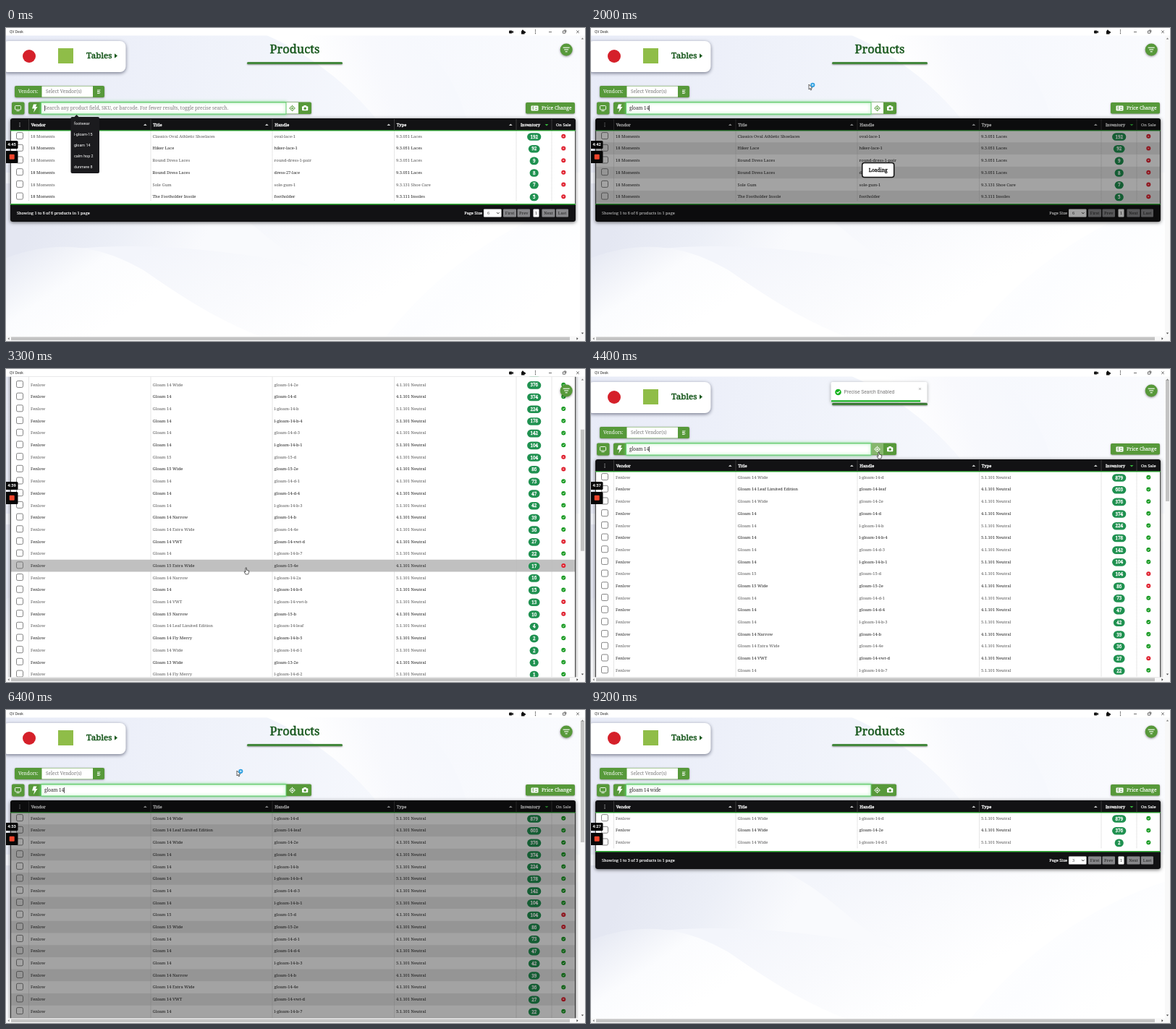
These frames come from a looping animation (800x433 px, 9500 ms). An HTML page with a canvas:

```html
<!DOCTYPE html>
<html lang="en">
<head>
<meta charset="utf-8">
<title>Products</title>
<style>
html, body { margin: 0; width: 100%; height: 100%; overflow: hidden; background: #fff; }
canvas { display: block; width: 800px; height: 433px; }
</style>
</head>
<body>
<canvas id="stage" width="800" height="433"></canvas>
<script>
const ctx = document.getElementById('stage').getContext('2d');
const LOOP = 9500, STEP = 100;
const SERIF = '"Noto Serif", serif', SANS = 'Roboto, sans-serif';
const GREEN = '#57993a', DARK_GREEN = '#17571c', LINE_GREEN = '#35b53a', BLACK = '#121214';
const ROW = 16.69, ROWS_TOP = 141.5, FOOT_HEIGHT = 24;
const COLUMNS = [31.5, 200, 368, 536.5, 705, 754];

const clamp = (v, lo = 0, hi = 1) => Math.min(hi, Math.max(lo, v));
const ease = p => p * p * (3 - 2 * p);
const during = (t, a, b) => t >= a && t < b;

// Each entry: name, handle, stock; "~" stands for the model name.
const shoes = `14 Wide|l-~-14-d|879
14 Leaf Limited Edition|~-14-leaf|603
14 Wide|~-14-2e|376
14|~-14-d|374
14|l-~-14-b|224
14|l-~-14-b-4|178
14|~-14-d-3|142
14|l-~-14-b-1|104
15|~-15-d|104
15 Wide|~-15-2e|86
14|~-14-d-1|73
14|~-14-d-4|47
14|l-~-14-b-3|42
14 Narrow|~-14-b|39
14 Extra Wide|~-14-4e|36
14 VWT|~-14-vwt-d|27
14|l-~-14-b-7|22
15 Extra Wide|~-15-4e|17
14 Narrow|l-~-14-2a|16
14|l-~-14-b-6|15
14 VWT|l-~-14-vwt-b|13
15 Narrow|~-15-b|10
14 Leaf Limited Edition|l-~-14-leaf|4
14 Fly Merry|l-~-14-b-5|2
14 Wide|l-~-14-d-1|2
13 Wide|~-13-2e|1
14 Fly Merry|l-~-14-d-2|1`.split('\n').map(line => {
  const [name, handle, stock] = line.split('|');
  return {
    vendor: 'Fenlow', title: 'Gloam ' + name, handle: handle.replace('~', 'gloam'), stock,
    type: (handle.startsWith('l-') ? '5' : '4') + '.1.101 Neutral',
    sale: !/^15|VWT/.test(name)
  };
});

const laces = `Classics Oval Athletic Shoelaces|oval-lace-1|051 Laces|192
Hiker Lace|hiker-lace-1|051 Laces|92
Round Dress Laces|round-dress-1-pair|051 Laces|9
Round Dress Laces|dress-27-lace|051 Laces|8
Sole Gum|sole-gum-1|131 Shoe Care|7
The Footholder Insole|footholder|111 Insoles|5`.split('\n').map(line => {
  const [title, handle, type, stock] = line.split('|');
  return { vendor: '18 Moments', title, handle, stock, type: '9.3.' + type, sale: false };
});

const views = {
  laces: { rows: laces, foot: 244 },
  all: { rows: shoes, foot: 930 },
  exact: { rows: shoes.filter(r => r.title === 'Gloam 14'), foot: 313 },
  wide: { rows: shoes.filter(r => r.title === 'Gloam 14 Wide'), foot: 196 }
};

const mousePath = [
  [200, 150, 200], [500, 106, 160], [700, 106, 160], [1300, 301, 78], [2200, 301, 78],
  [2700, 332, 275], [3500, 332, 275], [4000, 398, 115], [4800, 398, 115],
  [5500, 340, 110], [6100, 319, 84], [6900, 319, 84]
];

function mouseAt(t) {
  if (!during(t, 200, 6900)) return null;
  const i = mousePath.findIndex(p => p[0] > t);
  const [a, b] = [mousePath[i - 1], mousePath[i]];
  const p = ease((t - a[0]) / (b[0] - a[0]));
  return { x: a[1] + (b[1] - a[1]) * p, y: a[2] + (b[2] - a[2]) * p };
}

function stateAt(t) {
  const view = t < 2300 ? views.laces : t < 6800 ? views.all : t < 8800 ? views.exact : views.wide;
  const typed = Math.floor(clamp((t - 7100) / 160, 0, 5));
  return {
    t, view, mouse: mouseAt(t),
    scroll: 161.5 * (ease(clamp((t - 2600) / 500)) - ease(clamp((t - 3400) / 400))),
    loading: during(t, 900, 2300) || during(t, 6200, 6800) || during(t, 8300, 8800),
    query: t < 600 ? '' : 'gloam 14' + ' wide'.slice(0, typed),
    precise: t >= 4200
  };
}

function box(x, y, w, h, fill, r = 0, stroke, width = 1) {
  ctx.beginPath();
  ctx.roundRect(x, y, w, h, r);
  if (fill) { ctx.fillStyle = fill; ctx.fill(); }
  if (stroke) { ctx.strokeStyle = stroke; ctx.lineWidth = width; ctx.stroke(); }
}

function disc(x, y, r, fill) {
  ctx.beginPath();
  ctx.arc(x, y, r, 0, 7);
  ctx.fillStyle = fill;
  ctx.fill();
}

function poly(points, fill, stroke, width = 0.8) {
  ctx.beginPath();
  points.forEach(([x, y]) => ctx.lineTo(x, y));
  if (fill) { ctx.closePath(); ctx.fillStyle = fill; ctx.fill(); }
  if (stroke) { ctx.strokeStyle = stroke; ctx.lineWidth = width; ctx.stroke(); }
}

function text(str, x, y, size, color, { align = 'left', font = SERIF, heavy = 0, weight = 400 } = {}) {
  ctx.font = `${weight} ${size}px ${font}`;
  ctx.textAlign = align;
  ctx.fillStyle = color;
  ctx.fillText(str, x, y + size * 0.34);
  if (heavy) {
    ctx.strokeStyle = color;
    ctx.lineWidth = heavy;
    ctx.strokeText(str, x, y + size * 0.34);
  }
}

function withShadow(color, blur, dy, draw) {
  ctx.save();
  ctx.shadowColor = color;
  ctx.shadowBlur = blur;
  ctx.shadowOffsetY = dy;
  draw();
  ctx.restore();
}

function swoosh(path, x0, y0, x1, y1, ...stops) {
  const g = ctx.createLinearGradient(x0, y0, x1, y1);
  stops.forEach((c, i) => g.addColorStop(i / (stops.length - 1), c));
  ctx.fillStyle = g;
  ctx.fill(new Path2D(path));
}

function drawBackground() {
  swoosh('M0 0H800V433H0Z', 0, 0, 800, 120, '#e8ebf7', '#eff2fa', '#f6f8fd', '#fafbfe');
  swoosh('M360 10H560C610 50 640 100 650 200H560C520 120 450 50 360 10Z', 440, 100, 600, 40, '#ffffff', '#f8f9fd', '#f6f8fd');
  swoosh('M0 200H800V433H0Z', 300, 240, 420, 433, '#f3f5fb', '#f9fafd', '#ffffff');
  swoosh('M0 215H250C330 250 350 290 420 330C280 300 130 290 0 320Z', 60, 220, 260, 320, '#e4e7f2', '#eceff7', '#f9fafd');
  swoosh('M0 318C70 292 130 300 190 335C240 370 300 410 370 433H0Z', 20, 300, 110, 433, '#e6e9f3', '#fbfcfe', '#ffffff');
  swoosh('M520 433C590 340 690 270 800 235V433Z', 560, 300, 680, 433, '#ffffff', '#fcfdff', '#ffffff');
}

function drawTopBar() {
  box(0, 0, 800, 10.5, '#fff');
  text('QV Desk', 5, 5.5, 5, '#333', { font: SANS });
  box(695, 3.5, 4.5, 4, '#111', 1);
  poly([[699, 5.5], [701, 3.8], [701, 7.2]], '#111');
  box(712, 4, 4.5, 4.5, '#111', 0.6);
  disc(714, 3.6, 1.2, '#111');
  disc(716.8, 6, 1.2, '#111');
  for (const y of [3, 5.3, 7.6]) disc(731.5, y, 0.65, '#222');
  box(750, 5.2, 4, 0.7, '#333');
  box(769.5, 4, 3.2, 3.2, null, 0, '#333', 0.7);
  poly([[770.8, 3], [773.8, 3], [773.8, 6]], null, '#333', 0.7);
  cross(790, 5.3, 1.8, '#333', 0.7);
}

function cross(x, y, r, color, width) {
  poly([[x - r, y - r], [x + r, y + r]], null, color, width);
  poly([[x - r, y + r], [x + r, y - r]], null, color, width);
}

function drawPageHead() {
  withShadow('rgba(30,35,60,.6)', 5, 1.5, () => box(-5, 18, 170.5, 43, '#fff', 8));
  disc(32, 39, 9, '#d5202a');
  box(72, 28, 21, 21, '#8fbd48');
  text('Tables', 111, 38.3, 11.6, DARK_GREEN, { heavy: 0.5 });
  poly([[150, 35.3], [154, 38.5], [150, 41.7]], DARK_GREEN);
  text('Products', 399, 29.5, 16.4, DARK_GREEN, { align: 'center', heavy: 0.5 });
  withShadow('rgba(0,0,0,.4)', 2, 1, () => box(333, 47, 132, 3, '#43883c', 1.5));
}

function greenButton(x, y, w, h, fill = GREEN) {
  withShadow('rgba(0,0,0,.4)', 2.5, 0.8, () => box(x, y, w, h, fill, 2));
}

function drawControls({ t, query, precise, mouse }) {
  greenButton(12, 80, 124, 16);
  box(49.5, 80.5, 70.5, 15, '#fff');
  text('Vendors:', 17, 88, 6.6, '#fff');
  text('Select Vendor(s)', 55, 88, 6.5, '#777');
  for (let i = 0; i < 4; i++) box(126, 85.5 + i * 1.6, i % 2 ? 3.5 : 4.5, 0.8, '#fff');

  greenButton(8, 102.5, 17.5, 17);
  box(12.5, 107.5, 8, 5.5, null, 1, '#fff', 0.9);
  poly([[14.5, 114.7], [18.5, 114.7]], null, '#fff', 0.9);

  greenButton(31, 102.5, 391, 16.5);
  poly([[38, 105.5], [42.5, 105.5], [40.8, 109], [43.5, 109], [38, 117], [39.3, 111.5], [36, 111.5]], '#fff');
  withShadow('#6fe27c', 4, 0, () => box(48.5, 103, 338.5, 16, '#fff', 0, '#62cf70', 1));
  if (query) text(query, 53, 111, 6.3, '#222');
  else text('Search any product field, SKU, or barcode. For fewer results, toggle precise search.', 53, 111, 6.5, '#777');
  if (t < 9100) {
    ctx.font = `400 6.3px ${SERIF}`;
    box(53 + ctx.measureText(query).width, 107, 0.7, 8, '#222');
  }

  const hot = mouse && Math.abs(mouse.x - 395) < 9 && Math.abs(mouse.y - 111) < 8;
  box(387.5, 103, 16.5, 15.5, hot ? '#86b66d' : precise ? GREEN : '#fff');
  const ink = precise || hot ? '#fff' : GREEN;
  ctx.beginPath();
  ctx.arc(395.5, 111, 2.8, 0, 7);
  ctx.strokeStyle = ink;
  ctx.lineWidth = 0.9;
  ctx.stroke();
  disc(395.5, 111, 1.2, ink);
  for (const [dx, dy] of [[1, 0], [-1, 0], [0, 1], [0, -1]])
    poly([[395.5 + dx * 2.8, 111 + dy * 2.8], [395.5 + dx * 4.3, 111 + dy * 4.3]], null, ink, 0.9);

  box(409, 108.3, 8.3, 6, '#fff', 1);
  box(411.3, 107, 3.7, 2, '#fff', 0.5);
  disc(413.2, 111.3, 1.7, GREEN);

  greenButton(718, 103, 68, 15.5);
  box(725.5, 107.5, 10, 7, '#fff', 1);
  text('$', 728.2, 111, 4.5, GREEN, { font: SANS, align: 'center', weight: 700 });
  box(731, 109.5, 3, 0.7, GREEN);
  box(731, 112, 3, 0.7, GREEN);
  text('Price Change', 740, 110.8, 6.7, '#fff', { heavy: 0.15 });
}

function sortMark(x, color, down) {
  const d = down ? -1 : 1;
  poly([[x - 2.4, 134 + d], [x, 134 - d * 1.4], [x + 2.4, 134 + d]], color);
}

function drawRow(row, i, hover, loading) {
  const y = 149.8 + i * ROW;
  const ink = i % 2 || loading ? '#222' : '#555';
  if (hover) box(7, y - 8.2, 779.5, ROW, '#c0c0c0');
  else if (loading && i % 2) box(7, y - 8.2, 779.5, ROW, '#e8e8e8');
  box(14.5, y - 5.2, 9, 9, null, 1.8, '#666', 0.8);
  [row.vendor, row.title, row.handle, row.type].forEach((s, c) =>
    text(s, COLUMNS[c] + 2.6, y, 5.75, ink));
  const w = 8.7 + 3.5 * row.stock.length;
  box(729.7 - w / 2, y - 4.6, w, 10.6, '#1f9150', 5.3);
  text(row.stock, 729.7, y + 0.6, 6.3, '#fff', { align: 'center', heavy: 0.35 });
  disc(770.3, y, 3, row.sale ? '#189a22' : '#df1f2d');
  if (row.sale) poly([[769, y], [770, y + 1], [771.8, y - 1]], null, '#fff', 0.8);
  else cross(770.3, y, 0.9, '#fff', 0.7);
}

function drawFooter(count, top) {
  const y = top + 12;
  box(6, top, 781, FOOT_HEIGHT, BLACK, [0, 0, 3, 3]);
  box(6, top - 1, 781, 1.5, LINE_GREEN);
  text(`Showing 1 to ${count} of ${count} products in 1 page`, 15, y, 5.6, '#fff', { heavy: 0.15 });
  text('Page Size', 658, y, 5.6, '#fff', { align: 'right', heavy: 0.2 });
  box(660, y - 5.5, 24.5, 11, '#fff', 1);
  text(count, 665, y, 5.6, '#444');
  poly([[678, y - 1], [679.8, y + 1], [681.6, y - 1]], null, '#222', 0.8);
  [['First', 687, 18], ['Prev', 706.5, 17.5], ['Next', 740.5, 18], ['Last', 760, 17]].forEach(([label, x, w]) => {
    box(x, y - 5.5, w, 11, '#87878a', 1);
    text(label, x + w / 2, y, 5.7, '#222', { align: 'center' });
  });
  box(728.5, y - 5.5, 8, 11, '#fff', 1);
  text('1', 732.5, y, 5.6, '#333', { align: 'center' });
}

function drawTable({ view, loading, mouse, scroll }) {
  const { rows, foot } = view;
  const bottom = foot + FOOT_HEIGHT;
  withShadow('rgba(0,0,0,.6)', 5, 1, () => box(6, 125, 781, bottom - 125, '#fff', 3));
  const hovered = mouse && !loading ? Math.floor((mouse.y + scroll - ROWS_TOP) / ROW) : -1;
  rows.forEach((row, i) => drawRow(row, i, i === hovered, loading));

  ctx.setLineDash([1, 1]);
  for (const x of COLUMNS) poly([[x, 142], [x, foot - 4]], null, '#b8b8b8', 0.7);
  ctx.setLineDash([]);
  poly([[6.5, 127], [6.5, foot]], null, '#333', 0.9);
  poly([[786.5, 127], [786.5, foot]], null, '#333', 0.9);

  box(6, 125, 781, 17, BLACK, [3, 3, 0, 0]);
  box(6, 141.2, 781, 1.4, LINE_GREEN);
  for (const x of COLUMNS) box(x - 0.3, 126, 0.6, 15, '#555');
  for (const y of [131.5, 133.7, 135.9]) disc(19, y, 0.55, '#fff');
  ['Vendor', 'Title', 'Handle', 'Type'].forEach((label, c) => {
    text(label, COLUMNS[c] + 3.3, 133.7, 5.8, '#fff', { heavy: 0.3 });
    sortMark(COLUMNS[c + 1] - 7.7, '#ccc');
  });
  text('Inventory', 711, 133.7, 5.7, '#fff', { heavy: 0.3 });
  sortMark(747, '#37b63c', true);
  text('On Sale', 770.3, 133.7, 5.7, '#fff', { align: 'center', heavy: 0.2 });
  drawFooter(rows.length, foot);

  if (loading) {
    box(6, 125, 781, bottom - 125, 'rgba(0,0,0,.36)', 3);
    const y = (125 + bottom) / 2;
    box(374.7, y - 10, 44, 20, '#fff', 3, '#111', 1.5);
    text('Loading', 396.7, y, 6.7, '#111', { align: 'center', heavy: 0.3 });
  }
}

function drawSuggestions(t) {
  if (t >= 600) return;
  poly([[94, 123.5], [97.5, 120], [101, 123.5]], '#1b1b1e');
  box(89.5, 123, 39.5, 78, '#1b1b1e', 2);
  if (t >= 400) box(89.5, 155, 39.5, 14.5, '#44444a');
  ['footwear', 'l-gloam-15', 'gloam 14', 'calm hop 2', 'dunmere 8'].forEach((s, i) =>
    text(s, 94, 132 + i * 15, 5.4, '#fff', { font: SANS }));
}

function drawToast(t) {
  if (!during(t, 4200, 5900)) return;
  const shift = -45 * (1 - ease(clamp((t - 4100) / 200)) + ease(clamp((t - 5700) / 200)));
  ctx.save();
  ctx.translate(0, shift);
  withShadow('rgba(0,0,0,.35)', 4, 1, () => box(331.5, 18, 133, 28, '#fff', 2));
  disc(341.5, 32, 4.3, '#17b31f');
  poly([[339.5, 32], [341, 33.5], [343.8, 30.5]], null, '#fff', 1.1);
  text('Precise Search Enabled', 349.5, 31.5, 6.7, '#777', { font: SANS });
  cross(454.5, 27.5, 1.5, '#888', 0.6);
  box(332, 43.3, 132 * clamp(1 - (t - 4300) / 1500), 2.2, '#16b020');
  ctx.restore();
}

function drawScrollbars(scroll, long) {
  box(793, 10.5, 7, 422.5, '#f8f8f8');
  box(0, 426.5, 800, 6.5, '#f8f8f8');
  box(7, 427.5, 772, 4.5, '#c3c3c3');
  if (long) box(794, 15 + scroll * 0.425, 5, 168, '#c3c3c3');
  poly([[794.8, 15.5], [796.5, 13.5], [798.2, 15.5]], '#777');
  poly([[794.8, 421.5], [796.5, 423.5], [798.2, 421.5]], '#444');
  poly([[4.5, 428], [2.5, 429.7], [4.5, 431.4]], '#777');
  poly([[788.5, 428], [790.5, 429.7], [788.5, 431.4]], '#333');
}

function drawFilterButton() {
  withShadow('rgba(0,0,0,.45)', 3, 1, () => disc(774.2, 30, 8.5, GREEN));
  [9, 6, 3].forEach((w, i) => box(774.2 - w / 2, 26.6 + i * 2.8, w, 1.1, '#fff'));
}

function drawRecorder(t) {
  const left = 285 - Math.floor(t / 1000 * 1.98);
  const clock = `${Math.floor(left / 60)}:${String(left % 60).padStart(2, '0')}`;
  box(-2, 156, 18.5, 11, '#070707', 1.5);
  text(clock, 8, 161.5, 5.8, '#fff', { font: SANS, align: 'center', weight: 700 });
  box(-2, 170, 18.5, 17, '#070707', 1.5);
  box(4.7, 174.8, 7, 7, '#f0452c', 1);
}

function drawMouse({ mouse, loading, t, scroll }) {
  if (!mouse) return;
  const { x, y } = mouse;
  const overButton = Math.abs(x - 395) < 9 && Math.abs(y - 111) < 8;
  const hand = !loading && (overButton || y + scroll > ROWS_TOP || during(t, 400, 600));
  ctx.save();
  ctx.translate(x, y);
  if (hand) {
    poly([[-1, 0], [0.3, 0], [0.5, 3.2], [3.6, 4], [3.6, 6.5], [2.6, 9], [-1, 9], [-3, 5.6], [-2.2, 5], [-1, 6], [-1, 0]], '#fff', '#222', 0.7);
  } else {
    poly([[0, 0], [0, 7], [1.6, 5.6], [2.7, 8], [3.7, 7.5], [2.7, 5.2], [4.8, 5], [0, 0]], '#fff', '#222', 0.7);
  }
  if (loading) {
    disc(5.3, 0.8, 3.1, '#2f9fe0');
    disc(5.3, 0.8, 1.3, '#bfe6fa');
  }
  ctx.restore();
}

function draw(t) {
  const state = stateAt(t);
  drawBackground();
  ctx.save();
  ctx.beginPath();
  ctx.rect(0, 10.5, 793, 416);
  ctx.clip();
  ctx.translate(0, -state.scroll);
  drawPageHead();
  drawControls(state);
  drawTable(state);
  ctx.restore();
  drawSuggestions(t);
  drawToast(t);
  drawFilterButton();
  drawScrollbars(state.scroll, state.view === views.all);
  drawTopBar();
  drawRecorder(t);
  drawMouse(state);
}

const start = performance.now();
let last = -1;
function tick() {
  const elapsed = (performance.now() - start) % LOOP;
  const t = Math.floor(elapsed / STEP) * STEP;
  if (t !== last) draw(last = t);
  requestAnimationFrame(tick);
}
draw(0);
requestAnimationFrame(tick);
</script>
</body>
</html>
```
